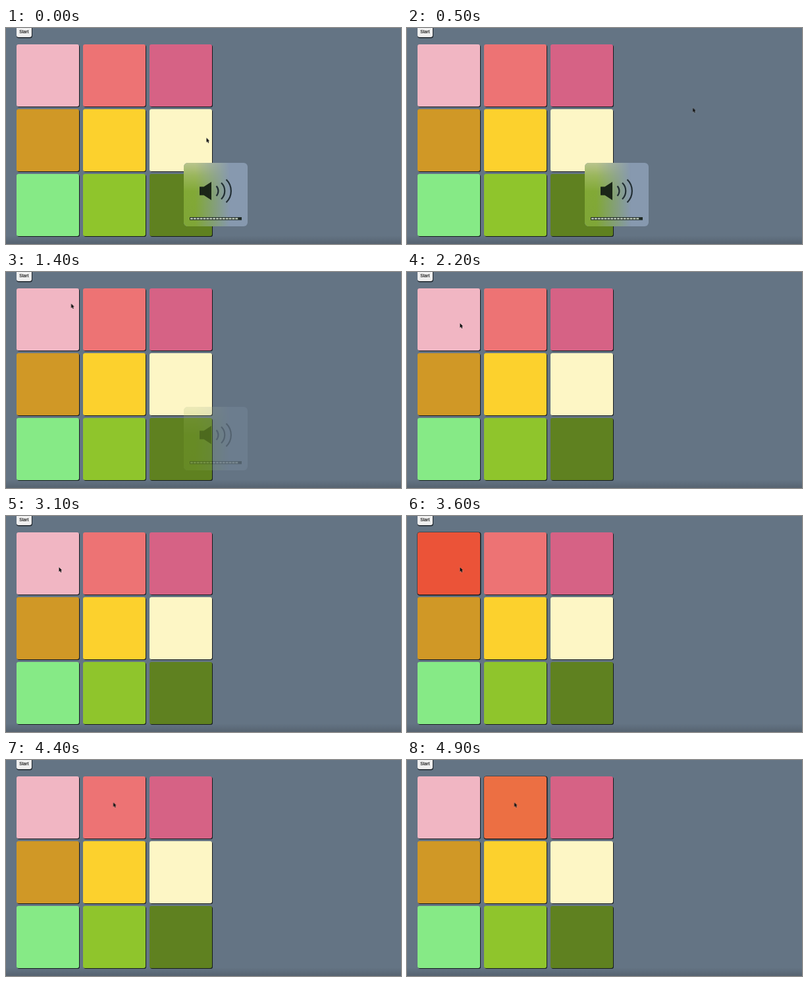
Write an HTML page that moves like this. It is 600 px wide and 330 px high and loops after 5000 ms.

```html
<!DOCTYPE html>
<html lang="en">
<head>
<meta charset="utf-8">
<title>Colour pads</title>
<style>
  html, body { margin: 0; width: 100%; height: 100%; overflow: hidden; background: #647484; }
  .stage {
    position: relative; width: 600px; height: 330px; overflow: hidden;
    background: linear-gradient(#647484 317px, #5f6e7d 322px, #566370 330px);
  }
  .stage > * { position: absolute; }

  .start {
    left: 16px; top: -6px; width: 22.5px; height: 19.5px;
    border-radius: 3px; background: #efefef;
    box-shadow: 0.5px 1px 0 0.5px #1d242b;
  }
  .label { left: 0; top: 0; font: 6.67px "Liberation Sans", Arial, sans-serif; }

  .pads {
    left: 16px; top: 25px;
    display: grid; grid-template: repeat(3, 95px) / repeat(3, 95px);
    gap: 4px 6px;
  }
  .pads i {
    background: var(--c); border-radius: 3px;
    box-shadow: 1px 1px 0.5px 0 #14191e;
  }
  .first { animation: press-first 5s step-end infinite; }
  .second { animation: press-second 5s step-end infinite; }
  @keyframes press-first {
    68% { background: #eb5338; box-shadow: 0.5px 0.5px 0 1px #1b1c1f; }
    78% { background: var(--c); box-shadow: 1px 1px 0.5px 0 #14191e; }
  }
  @keyframes press-second {
    92%, 100% { background: #ec6f43; box-shadow: 0.5px 0.5px 0 1px #1b1c1f; }
  }

  .volume {
    left: 270px; top: 206px; width: 97px; height: 97px;
    border-radius: 6px; overflow: hidden; background: #8799af;
    animation: fade 5s infinite;
  }
  .volume::before {
    content: ""; position: absolute; inset: 0;
    background: linear-gradient(#b9c48e, #9ab65c 20%, #82a936 45%, #7fa637);
    -webkit-mask: linear-gradient(90deg, #000 18%, transparent 72%);
    mask: linear-gradient(90deg, #000 18%, transparent 72%);
  }
  .volume svg { position: absolute; left: 0; top: 0; }
  @keyframes fade {
    0% { opacity: 1; }
    16% { opacity: 1; animation-timing-function: steps(8); }
    32%, 100% { opacity: 0; }
  }

  .cursor { left: 0; top: 0; animation: roam 5s infinite; }
  @keyframes roam {
    0%, 2% { transform: translate(304px, 167.5px); animation-timing-function: steps(5); }
    12% { transform: translate(466px, 110px); animation-timing-function: steps(1); }
    14%, 24% { transform: translate(464px, 104px); animation-timing-function: steps(2); }
    28% { transform: translate(98.5px, 48px); animation-timing-function: steps(4); }
    36%, 78% { transform: translate(80px, 78px); animation-timing-function: steps(3); }
    84%, 100% { transform: translate(162.5px, 64.5px); }
  }
</style>
</head>
<body>
<div class="stage">
  <div class="start"></div>
  <svg class="label" width="50" height="16"><text x="20.2" y="8" fill="#111" stroke="#111" stroke-width=".15">Start</text></svg>

  <div class="pads">
    <i class="first" style="--c:#f1b6c3"></i>
    <i class="second" style="--c:#ed7374"></i>
    <i style="--c:#d66285"></i>
    <i style="--c:#d09826"></i>
    <i style="--c:#fcd12d"></i>
    <i style="--c:#fdf6c5"></i>
    <i style="--c:#86ea86"></i>
    <i style="--c:#8fc52c"></i>
    <i style="--c:#5f8120"></i>
  </div>

  <div class="volume">
    <svg width="97" height="97">
      <path d="M24 36.5h6.5L42 29v28L30.5 49.500H24z" fill="#1b2618"/>
      <g fill="none" stroke="#222e33" stroke-width="2.2">
        <path d="M49.500 35.500a11 11 0 0 1 0 15"/>
        <path d="M57 30.500a17.500 17.500 0 0 1 0 25"/>
        <path d="M64.500 25.500a24.500 24.500 0 0 1 0 35"/>
      </g>
      <rect x="9" y="83" width="79" height="4.500" fill="#1f2a25"/>
      <path d="M10 85.250h73" stroke="#b4c0b0" stroke-width="2.500" stroke-dasharray="3.900 .98"/>
    </svg>
  </div>

  <svg class="cursor" width="9" height="12" overflow="visible">
    <path d="M.5 .3V7.200L2 5.800 3.100 8.300 4.300 7.800 3.200 5.300H5.200z"
          fill="#0b0b0b" stroke="#fff" stroke-opacity=".6" stroke-width=".6" paint-order="stroke"/>
  </svg>
</div>
</body>
</html>
```
